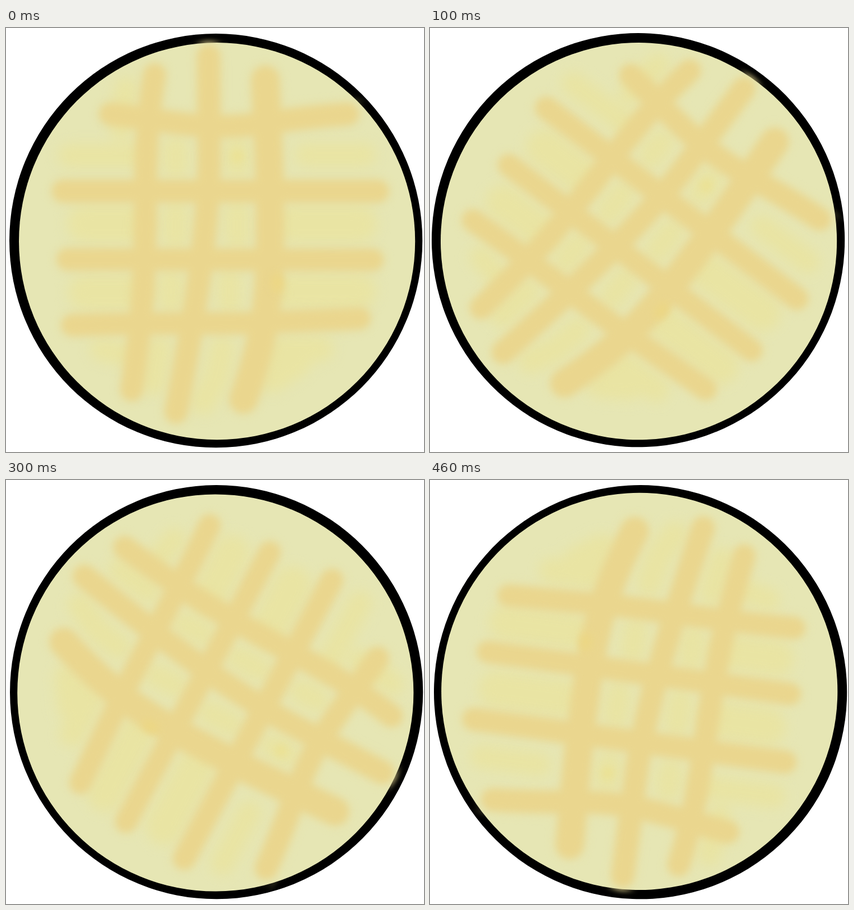
These frames come from a looping animation (744 px wide and 753 px high, 0.5 s). An HTML page:

```html
<!DOCTYPE html>
<html lang="en">
<head>
<meta charset="utf-8">
<title>Spinning cookie</title>
<style>
  html, body { margin: 0; width: 100%; height: 100%; overflow: hidden; background: #fff; }
  svg { display: block; width: 744px; height: 753px; }
  .lines { fill: none; stroke-linecap: round; stroke-linejoin: round; }
</style>
</head>
<body>
<svg viewBox="0 0 744 753">
  <defs>
    <filter id="soft" filterUnits="userSpaceOnUse" x="0" y="0" width="750" height="760" color-interpolation-filters="sRGB">
      <feGaussianBlur stdDeviation="7"/>
    </filter>
    <filter id="haze" filterUnits="userSpaceOnUse" x="0" y="0" width="750" height="760" color-interpolation-filters="sRGB">
      <feGaussianBlur stdDeviation="11"/>
    </filter>
    <filter id="smear" filterUnits="userSpaceOnUse" x="0" y="0" width="750" height="760" color-interpolation-filters="sRGB">
      <feGaussianBlur stdDeviation="8 3"/>
    </filter>
    <clipPath id="disc"><circle cx="374" cy="378" r="365"/></clipPath>
  </defs>
  <g id="cookie">
    <circle cx="374" cy="378" r="367.6"/>
    <g clip-path="url(#disc)">
      <ellipse cx="362" cy="26" rx="18" ry="4" fill="#57533a" filter="url(#smear)"/>
      <ellipse cx="628" cy="128" rx="14" ry="5" fill="#12120c" filter="url(#smear)"/>
    </g>
    <circle cx="376" cy="379" r="352.6" fill="#e6e6b4"/>
    <g id="glow" class="lines" stroke="#e9e4a3" filter="url(#haze)"></g>
    <g opacity="0.4" filter="url(#haze)"><use href="#strokes"/></g>
    <g filter="url(#soft)"><g id="strokes" class="lines" stroke="#ead68e"></g></g>
    <g filter="url(#soft)">
      <circle cx="412" cy="228" r="11" fill="#ebe193"/>
      <ellipse cx="483" cy="453" rx="11" ry="17" fill="#ecd785"/>
    </g>
  </g>
</svg>
<script>
const STEP = 100;
const poses = [
  { angle: 0, x: 373.6, y: 377.7 },
  { angle: 37.2, x: 370.6, y: 376.7 },
  { angle: 75.5, x: 368.6, y: 374.2 },
  { angle: 118, x: 374.6, y: 376.7 },
  { angle: 187.8, x: 374.6, y: 376.7 }
];

const cookie = document.getElementById("cookie");

function addLines(id, lines) {
  const group = document.getElementById(id);
  for (const [width, d] of lines) {
    const path = document.createElementNS("http://www.w3.org/2000/svg", "path");
    path.setAttribute("d", d);
    path.setAttribute("stroke-width", width);
    group.append(path);
  }
}

addLines("strokes", [
  [38, "M265 83C255 140 249 200 249 290C248 430 246 500 224 643"],
  [39, "M361 50L362 240C360 340 345 470 303 682"],
  [48, "M462 92C466 190 471 260 470 350C472 480 462 550 423 660"],
  [38, "M186 153C250 160 320 175 385 175C450 175 500 160 609 153"],
  [38, "M102 290H662"],
  [37, "M110 411L653 412"],
  [37, "M118 528C240 523 330 526 440 524L630 516"]
]);

addLines("glow", [
  [42, "M114 227H240M535 226H638"],
  [66, "M142 348H230M510 348H628"],
  [62, "M142 470H230M505 468H628"],
  [40, "M214 108L205 180M170 572L210 580"],
  [46, "M490 570H560M480 592L520 595L475 625"],
  [44, "M272 570L262 630M385 570L375 620L352 665"],
  [44, "M302 215V245M412 215V245M302 330V370M412 330V370M294 450V485M398 450V485"]
]);

function draw(now) {
  const { angle, x, y } = poses[Math.floor(now / STEP) % poses.length];
  cookie.setAttribute("transform", `translate(${x} ${y}) rotate(${angle}) translate(-374 -378)`);
}

const start = performance.now();
function tick() {
  draw(performance.now() - start);
  requestAnimationFrame(tick);
}
tick();
</script>
</body>
</html>
```
